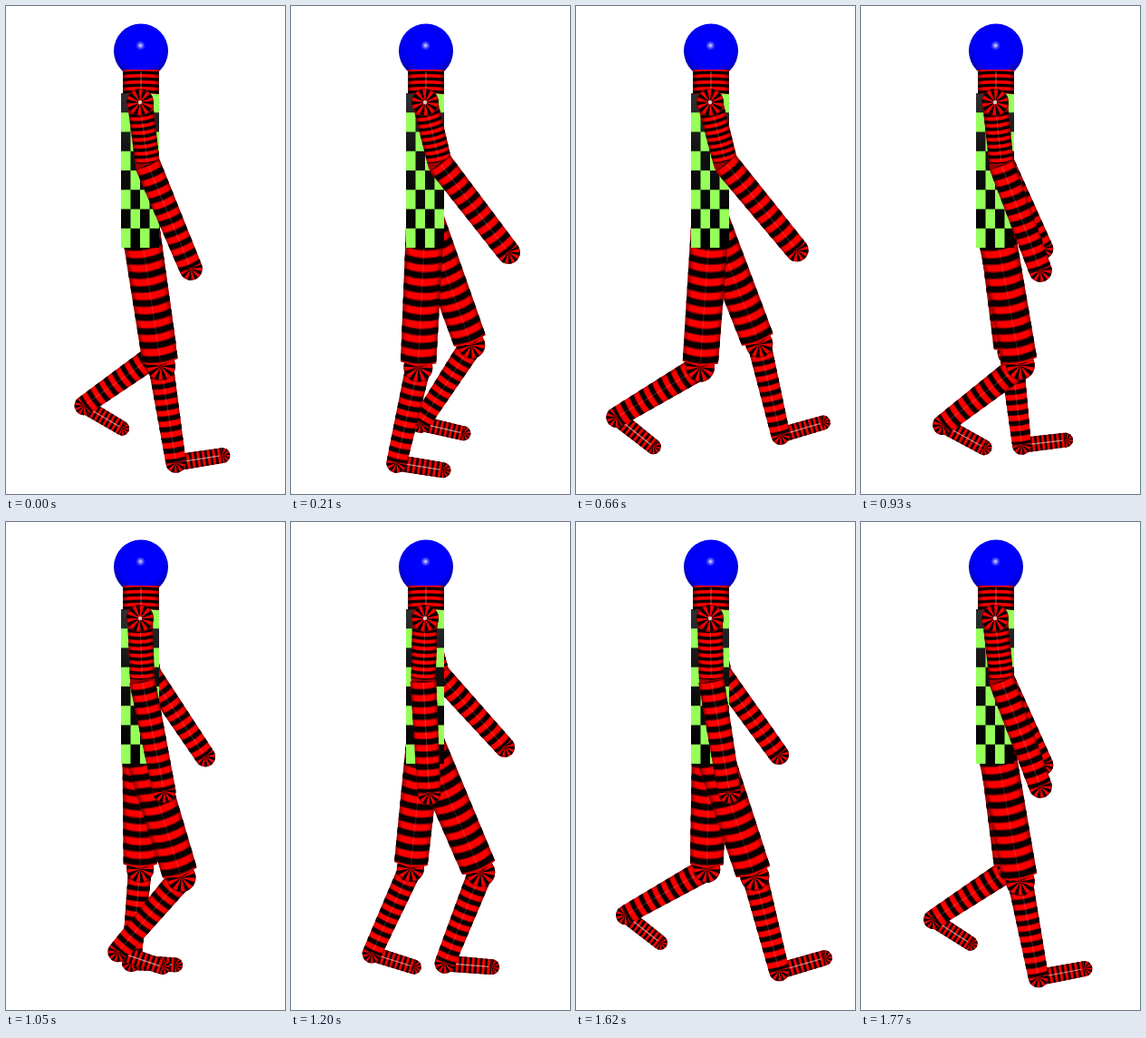
Recreate the animation shown at these times as an HTML page. Size 308 px wide and 537 px high, loop 1.8 s.

```html
<!DOCTYPE html>
<html lang="en">
<head>
<meta charset="utf-8">
<title>Walking figure</title>
<style>
  html, body { margin: 0; width: 100%; height: 100%; overflow: hidden; background: #fff; }
  svg { display: block; width: 100vw; height: 100vh; }
</style>
</head>
<body>
<svg id="stage" viewBox="0 0 308 537">
  <defs>
    <linearGradient id="shade">
      <stop offset="0" stop-color="#000" stop-opacity=".5"/>
      <stop offset=".15" stop-color="#000" stop-opacity="0"/>
      <stop offset=".85" stop-color="#000" stop-opacity="0"/>
      <stop offset="1" stop-color="#000" stop-opacity=".5"/>
    </linearGradient>
    <linearGradient id="dark" x2="0" y2="1">
      <stop offset="0" stop-color="#303030"/>
      <stop offset=".4" stop-color="#101010"/>
      <stop offset="1" stop-color="#000"/>
    </linearGradient>
    <radialGradient id="ball" cy=".42" r=".6">
      <stop offset="0" stop-color="#00f"/>
      <stop offset=".7" stop-color="#0000f8"/>
      <stop offset="1" stop-color="#000098"/>
    </radialGradient>
    <radialGradient id="glow">
      <stop offset="0" stop-color="#fff" stop-opacity=".9"/>
      <stop offset="1" stop-color="#88f" stop-opacity="0"/>
    </radialGradient>
  </defs>
</svg>
<script>
const LOOP = 1800, STEP = 30, RED = '#fb0000';
const stage = document.getElementById('stage');
let clips = 0;

function add(parent, tag, attrs = {}) {
  const node = document.createElementNS('http://www.w3.org/2000/svg', tag);
  for (const key in attrs) node.setAttribute(key, attrs[key]);
  return parent.appendChild(node);
}

// Sphere seen along its pole: ten dark wedges.
function fan(parent, y, r) {
  add(parent, 'circle', { cy: y, r, fill: RED });
  add(parent, 'circle', {
    cy: y, r: r / 2, fill: 'none', stroke: '#080000', 'stroke-width': r,
    'stroke-dasharray': Math.PI * r / 20
  });
  add(parent, 'circle', { cy: y, r: r - .6, fill: 'none', stroke: '#500', 'stroke-width': 1.2, opacity: .6 });
}

// Tapered striped cylinder running down from the local origin.
function tube(parent, { len, r0, r1, bulge = .12, shine = .15, bands = 9, offset = -.12 }) {
  const sag = r1 * bulge, end = len - r1 * .1;
  const d = `M${-r0} 0H${r0}L${r1} ${end - sag}Q0 ${end + sag} ${-r1} ${end - sag}Z`;
  const id = 'clip' + clips++;
  add(add(parent, 'clipPath', { id }), 'path', { d });
  add(parent, 'path', { d, fill: RED });

  const stripes = add(parent, 'g', { 'clip-path': `url(#${id})`, fill: 'none' });
  const pitch = len / bands, r = Math.max(r0, r1);
  for (let i = 0; i <= bands; i++) {
    const y = (i + offset) * pitch;
    const arc = `M${-r} ${y - sag}Q0 ${y + sag} ${r} ${y - sag}`;
    for (const [color, part] of [['#790000', .54], ['#080000', .38]])
      add(stripes, 'path', { d: arc, stroke: color, 'stroke-width': pitch * part });
  }
  add(parent, 'path', { d, fill: 'url(#shade)' });
  add(parent, 'path', { d: `M0 2V${end - 3}`, stroke: '#fff', 'stroke-width': 1.2, opacity: shine });
}

function limb(parent, spec) {
  const g = add(parent, 'g');
  fan(g, spec.len, spec.cap ?? spec.r1);
  tube(g, spec);
  return g;
}

function pose(node, x, y, angle) {
  node.setAttribute('transform', `translate(${x} ${y}) rotate(${-angle})`);
}

function makeArm(x, y, s) {
  const upper = add(stage, 'g'), upperLen = 69 * s;
  add(upper, 'circle', { cy: upperLen, r: 13.5 * s, fill: '#a00000' });
  tube(upper, { len: upperLen, r0: 14 * s, r1: 13.5 * s });
  fan(upper, 0, 15 * s);
  add(upper, 'circle', { r: 2.2 * s, fill: '#fff', opacity: .75 });
  const fore = limb(upper, { len: 124 * s, r0: 14.3 * s, r1: 12.7 * s });
  return swing => {
    const a = 7 + 10 * swing, b = 22.6 + 22.6 * swing;
    pose(upper, x, y, a);
    pose(fore, 0, upperLen, b - a);
  };
}

function makeLeg(x, y, thighLen, calfLen, footLen, s) {
  const thigh = add(stage, 'g'), calf = add(thigh, 'g'), foot = add(calf, 'g');
  limb(foot, { len: footLen, r0: 9 * s, r1: 8.4 * s, bulge: 0, shine: .55 });
  limb(calf, { len: calfLen, r0: 13.8 * s, r1: 11.2 * s });
  limb(thigh, {
    len: thighLen, r0: 21 * s, r1: 19.6 * s, cap: 16 * s,
    bulge: .18, shine: .1, bands: 10, offset: .5
  });
  return phase => {
    const flex = -31.5 + 32 * Math.cos(phase + .1);
    pose(thigh, x, y, 8.5 - 16.9 * Math.sin(phase));
    pose(calf, 0, thighLen, flex);
    pose(foot, 0, calfLen, 90 - .38 * flex);
  };
}

function makeBody() {
  const x = 127, y = 96, w = 42 / 4, h = 170 / 8;
  add(stage, 'rect', { x, y, width: 42, height: 170, fill: '#96ff5a' });
  let cells = '';
  for (let row = 0; row < 8; row++)
    for (let col = row % 2; col < 4; col += 2)
      cells += `M${x + col * w} ${y + row * h}h${w}v${h}h${-w}z`;
  add(stage, 'path', { d: cells, fill: 'url(#dark)' });

  add(stage, 'circle', { cx: 149, cy: 49.5, r: 30, fill: 'url(#ball)' });
  add(stage, 'circle', { cx: 148.5, cy: 43.5, r: 5.5, fill: 'url(#glow)' });

  const neck = add(stage, 'g', { transform: 'translate(149 70)' });
  tube(neck, { len: 28, r0: 20, r1: 20, bulge: -.05, shine: .3, bands: 4, offset: .45 });
}

const farArm = makeArm(147.3, 110, .87);
const farLeg = makeLeg(148, 231, 151, 103, 49, .94);
const nearLeg = makeLeg(148, 242, 156, 107.5, 52, 1);
makeBody();
const nearArm = makeArm(148, 106, 1);

function draw(ms) {
  const phase = Math.floor(ms % LOOP / STEP) * STEP / LOOP * 2 * Math.PI;
  const swing = Math.sin(phase);
  nearArm(swing);
  farArm(-swing);
  nearLeg(phase);
  farLeg(phase + Math.PI);
}

let start;
function tick(now) {
  start ??= now;
  draw(now - start);
  requestAnimationFrame(tick);
}
draw(0);
requestAnimationFrame(tick);
</script>
</body>
</html>
```
